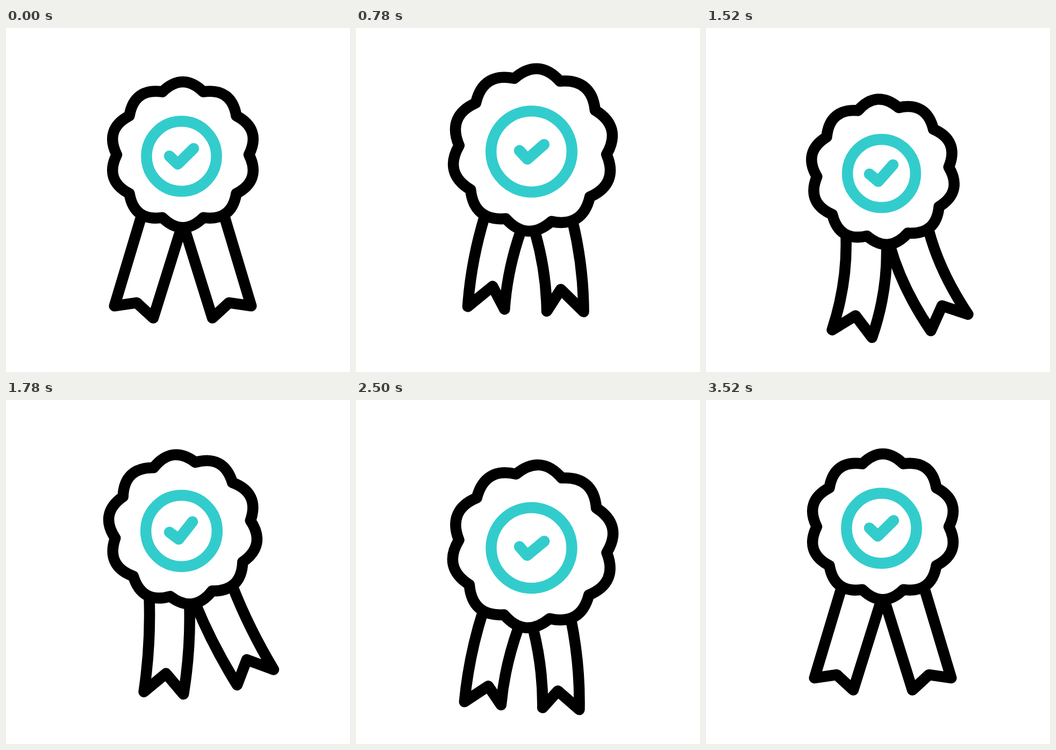
An HTML page that plays this animation: 640x640 px, repeating every 3600 ms.

```html
<!DOCTYPE html>
<html lang="en">
<head>
<meta charset="utf-8">
<title>Award badge</title>
<style>
  html, body { margin: 0; width: 100%; height: 100%; overflow: hidden; background: #fff; }
  svg { display: block; width: 100%; height: 100%; }
  path, circle { fill: none; stroke: #000; stroke-width: 20.5; stroke-linecap: round; stroke-linejoin: round; }
  #rosette { fill: #fff; }
  #ring, #check { stroke: #3cc; }
</style>
</head>
<body>
<svg viewBox="0 0 640 640">
  <g id="badge">
    <path id="left"/>
    <path id="right"/>
    <path id="rosette"/>
    <g transform="translate(-2.5 3)">
      <circle id="ring"/>
      <path id="check"/>
    </g>
  </g>
</svg>
<script>
const LOOP = 3600, STEP = 20, RAD = Math.PI / 180;
const el = id => document.getElementById(id);
const [badge, left, right, rosette, ring, check] =
  ['badge', 'left', 'right', 'rosette', 'ring', 'check'].map(el);

// A value that swings between [time, value] keys on half cosine waves
const track = (...keys) => t => {
  const i = Math.max(0, Math.min(keys.length - 2, keys.findLastIndex(k => k[0] <= t)));
  const [[t0, a], [t1, b]] = keys.slice(i, i + 2);
  const u = Math.max(0, Math.min(1, (t - t0) / (t1 - t0)));
  return a + (b - a) * (1 - Math.cos(Math.PI * u)) / 2;
};

const height = track([200, 235.7], [600, 211.5], [1200, 286], [2040, 228], [2720, 286], [3400, 235.7]);
const scale = track([200, 1], [740, 1.118], [1520, 1], [2320, 1.13], [3440, 1]);
const ringSize = track([200, 65.1], [740, 75.4], [1520, 63.4], [2320, 75.7], [3440, 65.1]);
const tilt = track([200, 0], [960, 4], [1840, -7.5], [2540, 5], [3320, 0]);
const sway = track([560, 0], [1020, -5.5], [1740, 9.8], [2600, -4.4], [3400, 0]);
const billow = track([200, 0], [780, 5], [1500, -8], [2280, 6], [3000, 0]);
const notchDepth = track([200, 18], [800, 42], [1560, 34], [2100, 41], [3140, 18]);
const checkGrowth = track([2600, 0], [3060, 9.2], [3500, 0]);

const rotate = ([x, y], a) =>
  [x * Math.cos(a) - y * Math.sin(a), x * Math.sin(a) + y * Math.cos(a)];
const fmt = p => p.map(n => n.toFixed(2)).join(' ');

// Ten lobes, each one cubic from notch to notch
function rosettePath(s, angle) {
  const at = (x, y, k) => fmt(rotate([x * s, -y * s], angle + k * Math.PI / 5));
  let d = 'M' + at(-38, 117, 0);
  for (let k = 0; k < 10; k++)
    d += `C${at(-13, 141.6, k)} ${at(13, 141.6, k)} ${at(38, 117, k)}`;
  return d + 'Z';
}

// The end swings on a circle around the badge; growth narrows and twists it
function ribbonPath(side, t, s, angle) {
  const grow = s - 1;
  const swing = (17.3 - 29 * grow + side * sway(t)) * RAD;
  const twist = 105 * grow * RAD;
  const width = 37.8 - 30 * grow;
  const place = (x, y) => {
    const [px, py] = rotate([x, y], -swing);
    return [side * px, py];
  };
  const end = k => place(k * width * Math.cos(twist), 306.5 + k * width * Math.sin(twist));
  const outer = end(1), inner = end(-1), notch = place(0, 306.5 - notchDepth(t));
  const outerTop = rotate([side * (77 + 40 * grow), 114 * s], angle);
  const innerTop = rotate([side * (3 + 90 * grow), 137 * s], angle);
  const bend = (a, b) => fmt([(a[0] + b[0]) / 2 + side * 2 * billow(t), (a[1] + b[1]) / 2]);
  return `M${fmt(outerTop)}Q${bend(outerTop, outer)} ${fmt(outer)}L${fmt(notch)}L${fmt(inner)}`
    + `Q${bend(inner, innerTop)} ${fmt(innerTop)}`;
}

function checkPath(growth, angle) {
  const corner = [-7, 14.5];
  const arm = (x, y) => {
    const k = 1 + growth / Math.hypot(x, y);
    return fmt(rotate([corner[0] + x * k, corner[1] + y * k], angle));
  };
  return `M${arm(-15.5, -15)}L${fmt(rotate(corner, angle))}L${arm(29.5, -29)}`;
}

function draw(t) {
  const s = scale(t), angle = tilt(t) * RAD;
  badge.setAttribute('transform', `translate(329 ${height(t).toFixed(2)})`);
  left.setAttribute('d', ribbonPath(-1, t, s, angle));
  right.setAttribute('d', ribbonPath(1, t, s, angle));
  rosette.setAttribute('d', rosettePath(s, angle));
  ring.setAttribute('r', ringSize(t));
  check.setAttribute('d', checkPath(checkGrowth(t), angle));
}

const start = performance.now();
function tick() {
  const t = (performance.now() - start) % LOOP;
  draw(t - t % STEP);
  requestAnimationFrame(tick);
}
tick();
</script>
</body>
</html>
```
